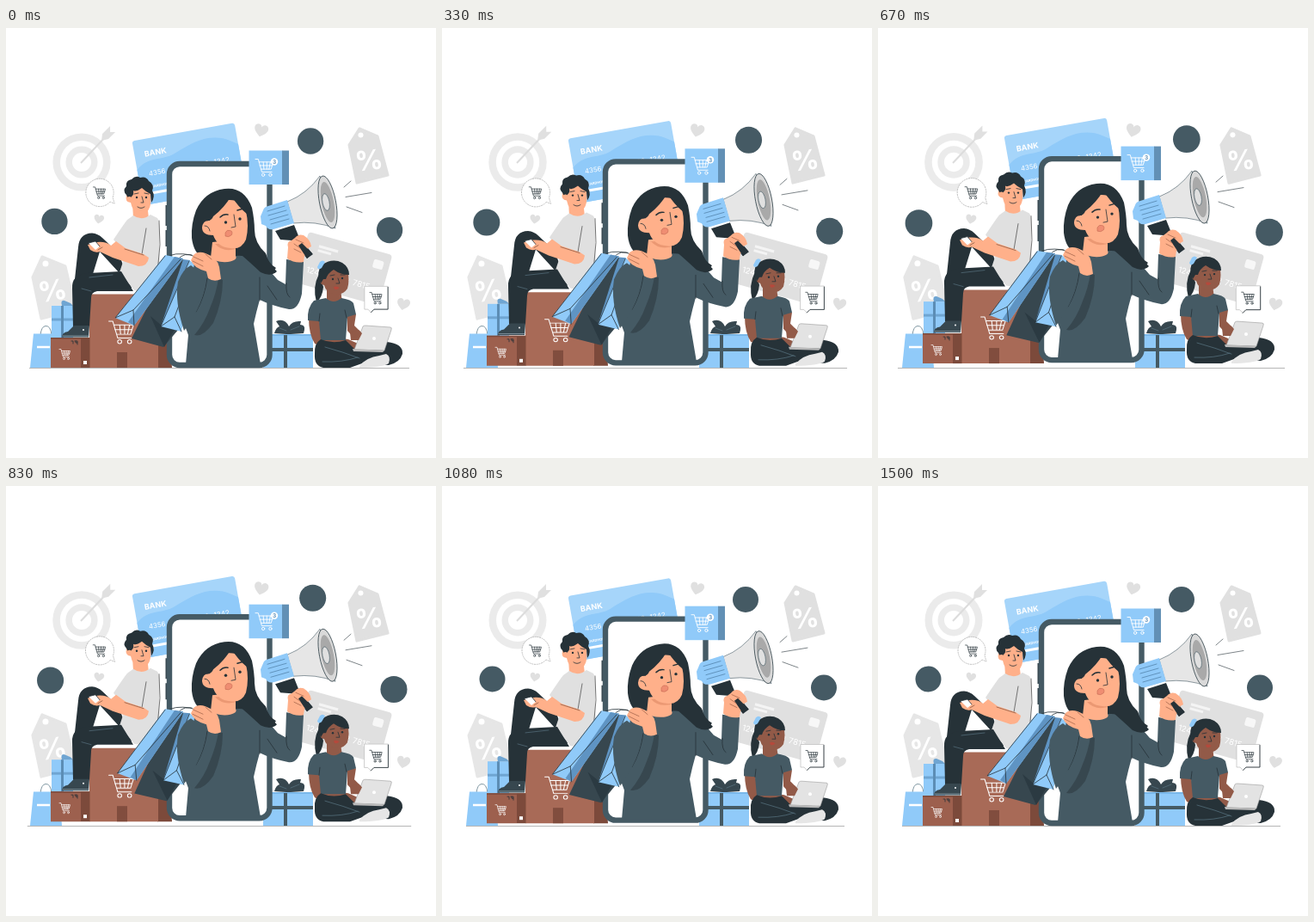
These frames come from a looping animation (500 px wide and 500 px high, 1.54 s). An HTML page:

```html
<!DOCTYPE html>
<html lang="en">
<head>
<meta charset="utf-8">
<title>Online shopping</title>
<style>
html, body { margin: 0; width: 100%; height: 100%; overflow: hidden; background: #fff; }
svg { display: block; width: 100%; height: 100%; }
text { font-family: Inter, "Open Sans", sans-serif; }
.b { fill: #90caf9; }
.d { fill: #455a64; }
.k { fill: #263238; }
.g { fill: #e0e0e0; }
.l { fill: #ebebeb; }
.w { fill: #fff; }
.s { fill: #ffb08a; }
.t { fill: #925a48; }
.ln { fill: none; stroke: #263238; stroke-width: .8; stroke-linecap: round; stroke-linejoin: round; }
</style>
</head>
<body>
<svg viewBox="0 0 500 500">
<defs>
  <g id="cart" fill="none" stroke-linecap="round" stroke-linejoin="round">
    <path d="M0 0H4L9 18H23M5 4H25L22 14H8M6 9H23.500M11 4L12 14M16 4V14M21 4L19 14"/>
    <circle cx="11" cy="22" r="2"/><circle cx="21" cy="22" r="2"/>
  </g>
  <path id="heart" d="M0 7C-4 4-8 1-8-3C-8-8-1-9 0-4C1-9 8-8 8-3C8 1 4 4 0 7Z"/>
</defs>

<path data-beat=".04 248 395" d="M28 395.500H468" stroke="#b5b5b5"/>

<!-- background -->
<g data-beat=".02 88 156">
  <circle class="l" cx="88" cy="156" r="33.500"/><circle class="w" cx="88" cy="156" r="25"/>
  <circle class="l" cx="88" cy="156" r="18.500"/><circle class="w" cx="88" cy="156" r="11"/>
  <path d="M87 157L119 123" stroke="#dcdcdc" stroke-width="2"/>
  <path class="g" d="M111 131L112 123L121 114L121 121L127 121L119 129Z"/>
</g>
<g data-beat=".01 422 148">
  <path class="g" stroke="#e0e0e0" stroke-width="3" stroke-linejoin="round" d="M411 117L432 126L444 171L408 180L399 136Z"/>
  <circle class="w" cx="412.500" cy="124.500" r="3"/>
  <text class="w" x="422" y="165" font-size="32" font-weight="700" text-anchor="middle" transform="rotate(-7 422 154)">%</text>
</g>
<g data-beat=".01 55 300">
  <path fill="#e6e6e6" stroke="#e6e6e6" stroke-width="3" stroke-linejoin="round" d="M42 266L69 277L81 328L41 338L31 290Z"/>
  <circle class="w" cx="46" cy="274" r="3.500"/>
  <text class="w" x="54" y="317" font-size="33" font-weight="700" text-anchor="middle" transform="rotate(-10 54 306)">%</text>
</g>
<g class="g">
  <use href="#heart" data-beat=".08 296.500 119" data-at="translate(296.500 119.500) rotate(14)"/>
  <use href="#heart" data-beat=".08 108 222" data-at="translate(108 222.500) rotate(10) scale(.72)"/>
  <use href="#heart" data-beat=".08 462 321" data-at="translate(462 321.500) rotate(12) scale(.93)"/>
</g>
<g transform="translate(352 237) rotate(15.500)">
  <rect class="g" width="101" height="61" rx="4"/>
  <path d="M16 13H39M16 18H32" stroke="#f4f4f4" stroke-width="3"/>
  <rect x="82" y="10" width="12" height="10" rx="2" fill="#f7f7f7"/>
  <text class="w" font-size="9.500" y="46"><tspan x="9">1245</tspan><tspan x="38">6542</tspan><tspan x="65">7815</tspan></text>
</g>

<!-- bank card -->
<g data-float="6"><g transform="translate(146.500 131.500) rotate(-10.100)">
  <rect width="121" height="76" rx="3" fill="#a6d5fa"/>
  <path class="b" d="M0 34C16 20 30 29 46 23C66 15 80 10 96 13C108 15 116 22 121 25V73Q121 76 118 76H3Q0 76 0 73Z"/>
  <text class="w" x="11.500" y="20.500" font-size="9" font-weight="700">BANK</text>
  <text class="w" font-size="8" y="43.500"><tspan x="12.500">4356</tspan><tspan x="38">8217</tspan><tspan x="64">6093</tspan><tspan x="89.500">1342</tspan></text>
  <text class="w" x="13" y="57.500" font-size="4" font-weight="700">CARDHOLDER</text>
  <path d="M13 63.500H34" stroke="#fff" stroke-width="3"/>
</g></g>

<!-- parcels on the ground -->
<g>
  <path class="ln" d="M40 357Q41 347 46 346.500Q52 346 53 357" style="stroke:#607d8b"/>
  <path class="b" d="M32 355.500H62L65 395H28Z"/>
  <path d="M36 371H51" stroke="#fff" stroke-width="2.500"/>
  <rect class="b" x="299" y="357" width="58" height="38"/>
  <rect x="298" y="356" width="59.500" height="2" fill="#7ab8ea"/>
  <path d="M299 374H357M325 357V395" stroke="#455a64" stroke-width="4"/>
  <path d="M326 356L312 355Q314 348 318 347L314 341Q324 337 329 347Q333 340 343 341L342 345Q348 345 347 351L346 355L331 356Z" fill="#37474f"/>
  <path class="ln" d="M326 352L318 349M331 351L341 347" style="stroke:#607d8b;stroke-width:.6"/>
</g>

<!-- boxes -->
<g data-float="5">
  <rect class="b" x="53" y="323" width="25" height="40"/>
  <path d="M53 339H78" stroke="#6fa5d2" stroke-width="3"/>
  <path d="M65.500 323V361" stroke="#5c8db5" stroke-width="3"/>
  <path d="M65 323Q63 316 68 317L75 320L78 323Z" fill="#6fa5d2"/>
  <path d="M176 310H187L193 395H176Z" fill="#7c4a3b"/>
  <path d="M97 309.500H177V395H97Z" fill="#a86a57"/>
  <rect x="129" y="377" width="12" height="18" fill="#814d3e"/>
  <use href="#cart" transform="translate(119.500 341) scale(1.150 1.080)" stroke="#fff" stroke-width=".9"/>
  <path d="M52 360H87V395H52Z" fill="#9d604e"/>
  <path d="M87 360H97.500V395H87Z" fill="#7c4a3b"/>
  <path d="M52 360H97V361.500H52Z" fill="#7c4a3b"/>
  <rect class="w" x="90" y="387" width="4" height="4"/>
  <path d="M76 364H78V367M80 364H83V366H81V364M83 366V368" class="ln"/>
  <use href="#cart" transform="translate(62 373.500) scale(.5)" stroke="#fff" stroke-width="1.400"/>
</g>

<!-- seated man -->
<g data-float="5.500">
  <path class="k" d="M80 292L84 255Q85 239 100 238.500Q107 239 112 244L131 262L146 302L94 302L131 284L109 260L101 286Z"/>
  <path class="s" d="M147 203H164L166 222Q158 229 148 221Z"/>
  <path class="g" d="M148 218Q158 225 168 217L176 221Q180 227 178 250L179 298Q165 309 149 305L132 284L140 260Q130 253 125 246Q137 228 141 223Z"/>
  <path class="ln" d="M163 233L158 263L136 257M178 224L179 252L175 296" style="stroke:#555"/>
  <path class="s" d="M128 248L139 256L160 263L166 267Q165 277 154 277Q136 271 124 267L109 260Q104 262 98 258L95 252L106 249Q116 248 122 253Z"/>
  <path d="M96 250L104 248L109 254L104 258Z" class="w"/><path class="ln" d="M96 250L104 248L109 254"/>
  <path class="ln" d="M160 264L138 257M107 258L112 255" style="stroke:#8d5b45"/>
  <path class="k" d="M77 303Q76 286 96 285L134 283L148 306H106Q99 307 99 314L97 347H78Z"/>
  <path class="ln" d="M97 290L124 287M99 306L88 303" style="stroke:#607d8b;stroke-width:.6"/>
  <path d="M79 346H97L96 359.500H65Q65 354 72 353Z" fill="#37474f"/>
  <path class="ln" d="M66 358H96" style="stroke:#90a4ae"/><circle class="w" cx="90" cy="351" r="1"/>
  <path class="s" d="M143 186Q156 178 168 187L168.500 200Q168 215 158 216Q147 215 145 203Q138 202 140 195Z"/>
  <path class="k" d="M144 202L140 194Q135 189 140 184Q139 177 146 176Q151 171 156 174Q163 172 166 178Q173 182 170 189Q174 196 169 203L168 193Q162 190 158 186Q151 191 148 189Q149 194 146 196Z"/>
  <circle class="s" cx="143.500" cy="199" r="3"/>
  <circle class="k" cx="152" cy="197" r="1.200"/><circle class="k" cx="163" cy="197" r="1.200"/>
  <path class="ln" d="M149 193L154 192M161 192L166 193M158 196L160 203L157 203M153 208Q157 211 161 208"/>
</g>

<!-- phone -->
<g data-float="6">
  <path d="M187 206V230M187 235V254" stroke="#37474f" stroke-width="3"/>
  <rect class="w" x="190" y="158" width="116.500" height="234" rx="12" stroke="#455a64" stroke-width="6.400"/>
</g>

<!-- cart tile -->
<g data-float="5">
  <rect class="b" x="282.500" y="142.500" width="39" height="39.500"/>
  <path d="M321 142.500H329V182H321Z" fill="#6290b5"/>
  <use href="#cart" transform="translate(290 152.500) scale(.83)" stroke="#fff" stroke-width="1.100"/>
  <circle class="w" cx="312" cy="155.500" r="4.200"/>
  <text x="312" y="157.800" font-size="6.500" font-weight="700" text-anchor="middle" fill="#5f90b8">3</text>
</g>

<!-- woman, bags and megaphone -->
<g data-float="6">
  <path class="k" d="M254 187Q277 184 286 209Q289 224 289 235Q289 250 302 262Q305 274 314 279Q308 288 291 280L266 268H230Q218 262 216 244Q215 228 221 212Q231 190 254 187Z"/>
  <path class="d" d="M238 267Q255 272 267 265Q284 264 291 271L303 278Q309 285 316 293L325 298L326 269L346 272L344 309Q340 328 329 327Q309 323 295 316Q291 330 288 344L296 391H209L212 357Q197 318 199 296Q204 276 224 270Z"/>
  <path class="s" d="M240 249L267 246L267 265Q270 270 258 272Q244 273 238 267Z"/>
  <path d="M243 251Q252 261 267 257V250Z" fill="#eb9873"/>
  <path class="k" d="M268 259L288 242Q293 258 302 263Q304 273 315 283Q308 290 296 284Q281 270 268 259Z"/>
  <g transform="translate(2 0)">
    <path class="s" d="M235 224Q241 203 256 200Q272 199 277 213Q281 230 277 246Q272 258 259 256Q244 255 239 241Q226 241 226 232Q227 223 235 224Z"/>
    <path class="k" d="M224 234Q223 226 230 224Q237 225 239 219Q252 209 260 195Q267 207 279 217L284 214Q278 190 252 188Q225 193 220 220Z"/>
    <circle class="k" cx="253.500" cy="226" r="1.700"/><circle class="k" cx="270" cy="222" r="1.700"/>
    <path class="ln" d="M247 220Q251 216 256 217M267 212L274 210" style="stroke-width:1.500"/>
    <path class="ln" d="M263 217L265 231L260 232M229 230Q234 230 235 236"/>
    <path d="M253 238Q255 234 258.500 235.500Q262 236 260.500 240.500Q257 244 253 242Z" fill="#ef8d72" stroke="#b8614a" stroke-width=".5"/>
  </g>
  <path class="d" d="M215 276L233 290L252 293Q252 318 241 343Q229 360 219 357Q208 352 203 335Q196 319 200 295Q206 280 215 276Z"/>
  <path d="M252 293Q252 318 241 343Q229 360 219 357Q231 343 237 326Q245 307 247 291Z" fill="#37474f"/>
  <path class="ln" d="M234 291Q231 313 221 330M295 317V290M304 300L315 316M326 297Q325 310 330 313"/>

  <g data-swing="-2 212 264">
    <path class="ln" d="M188 267Q193 260 216 264M199 270Q207 259 220 266"/>
    <path d="M194 266L218 273L207 343L183 371L146 361L170 313Z" fill="#37474f"/>
    <path d="M184 371L201 342L181 346L168 335Z" fill="#2b3a42"/>
    <path class="b" d="M185 264L206 268L149 346L127 337Z"/>
    <path d="M196 266L206 268L149 346L142 342Z" fill="#5f94c3"/>
    <path class="ln" d="M185 265L127 337L148 328L203 269M148 328L149 346"/>
    <path d="M206 269L214 270L193 333L180 347Z" fill="#5f94c3"/>
    <path class="b" d="M213 270L219 274L204 353L180 347Z"/>
    <path class="ln" d="M213 271L180 347L196 336L216 282M196 336L204 353"/>
  </g>
  <path class="d" d="M215 276L233 290Q231 320 207 352Q196 319 200 295Q206 280 215 276Z"/>
  <path class="s" d="M218 264Q223 259 232 262Q246 267 248 278L250 292Q242 296 235 291L233 283Q218 279 215 270Z"/>
  <path class="ln" d="M218 266L229 271M217 271L229 277M232 263L239 269" style="stroke:#a9694e"/>

  <path class="k" d="M313 236L335 229L341 244L356 262L350 268L332 247L319 246Z"/>
  <path d="M327 202Q350 193 365 172L383 233Q360 224 334 227Z" fill="#e6e6e6" stroke="#455a64" stroke-width=".6"/>
  <ellipse cx="374" cy="202.500" rx="9.500" ry="31" transform="rotate(-11 374 202.500)" fill="#d9d9d9" stroke="#37474f" stroke-width=".8"/>
  <ellipse cx="374" cy="202.500" rx="7" ry="24" transform="rotate(-11 374 202.500)" fill="#a9a9a9"/>
  <ellipse cx="372" cy="202.500" rx="4" ry="10" transform="rotate(-11 372 202.500)" fill="#e0e0e0" stroke="#455a64" stroke-width=".6"/>
  <path class="b" d="M299 212Q300 208 305 207L327 200L335 227L311 234Q304 235 302 230L297 228L296 219Z"/>
  <path class="ln" d="M304 213L324 207M305 218L326 212M307 223L328 217M308 228L329 222" style="stroke:#5484ac"/>
  <path class="s" d="M336 244Q340 239 346 241Q354 246 355 254L350 257Q353 263 347 265L346 272Q336 274 327 268L328 255Q326 248 332 247Z"/>
  <path class="k" d="M340 253L344 250L357 263L350 268Z"/>
  <path class="ln" d="M337 246L346 250M335 251L342 256M335 257L343 261" style="stroke:#a9694e"/>
  <path class="ln" d="M393 185L401 178M395 196.500L425 191.500M396 208L414 214.500" style="stroke-width:.6"/>
</g>

<!-- seated woman -->
<g data-float="5">
  <path class="k" d="M364 286Q356 301 361 319Q368 313 369 301Z"/>
  <path class="t" d="M373 304H389L391 319Q381 325 373 317Z"/>
  <path class="t" d="M352 337L364 340L369 358L398 362L414 369L411 375L388 374Q367 372 359 367Q352 356 352 337ZM397 333L407 333L405 346L413 354L407 363L397 352Z"/>
  <path class="d" d="M372 314Q381 322 390 314Q402 316 404 320L407 333L397 336L395 363H366L364 341L351 340Q350 325 358 317Z"/>
  <path class="ln" d="M364 341L365 332M396 337L394 328"/>
  <path class="k" d="M366 362Q380 368 395 363L405 373Q423 366 443 365Q462 367 461 379Q458 389 445 392L414 390L400 395H369Q358 393 359 379Q358 367 366 362Z"/>
  <path class="ln" d="M371 371Q393 377 411 384M368 388Q391 389 409 383" style="stroke:#546e7a"/>
  <path d="M411 393Q419 383 434 381L442 379Q448 382 445 390Q437 395 411 395Z" fill="#e6e6e6"/>
  <path class="t" d="M370 284Q382 274 397 282Q400 292 397 303Q391 312 380 309Q372 307 370 299Q364 298 365 291Z"/>
  <path class="k" d="M366 297Q360 284 367 276Q379 267 391 273Q399 278 399 287Q389 287 381 281Q374 285 372 292L369 292Z"/>
  <path d="M365 272Q368 269 371 272L367 279Q363 282 362 278Z" class="b"/>
  <circle class="k" cx="380" cy="292" r="1.200"/><circle class="k" cx="391" cy="291" r="1.200"/>
  <path class="ln" d="M377 288L382 287M389 287L394 287M386 291L388 297L384 297"/>
  <path d="M381 301Q385 299.500 387.500 302Q385 305 382 303.500Z" fill="#b5493c"/>
  <path d="M415 347Q416 346 418 346L447 348Q449 348 448 351L440 375L405 374Z" fill="#e3e3e3" stroke="#9a9a9a" stroke-width=".6"/>
  <path d="M403 373L440 375L438 377L404 376Z" fill="#b9b9b9"/>
  <circle class="w" cx="428" cy="361" r="2"/>
  <path class="t" d="M400 354L410 351L414 355L410 363L401 363Z"/>
</g>

<!-- bubbles -->
<g data-beat=".09 109.500 191">
  <path class="w" d="M121 202A16 16 0 1 1 124 197L126 204Z" stroke="#aaa" stroke-width=".7" stroke-dasharray="2 .7"/>
  <use href="#cart" transform="translate(101.500 185) scale(.56)" stroke="#263238" stroke-width="1.200"/>
</g>
<g data-beat=".09 430.500 314">
  <path class="w" d="M417 300.500H444V327H428L424.500 330.500L421 327H417Z" stroke="#bbb" stroke-width=".7"/>
  <path class="ln" d="M444 301.500V327H428L424.500 330.500"/>
  <use href="#cart" transform="translate(423 307.500) scale(.56)" stroke="#263238" stroke-width="1.200"/>
</g>

<!-- round badges -->
<g class="d" data-beat=".1 251 181">
  <circle cx="58.500" cy="224.500" r="15"/>
  <circle cx="353" cy="132" r="15"/>
  <circle cx="444" cy="234.500" r="15"/>
</g>
</svg>
<script>
const LOOP = 1540, SPAN = 1500, LEAD = 15;
const floats = [...document.querySelectorAll('[data-float]')];
const beats = [...document.querySelectorAll('[data-beat]')].map(el => {
  const [amp, x, y] = el.dataset.beat.split(' ').map(Number);
  return { el, amp, x, y, at: el.dataset.at || '' };
});
const bags = document.querySelector('[data-swing]');
const [angle, px, py] = bags.dataset.swing.split(' ').map(Number);

// Two linear pulses, then a rest
const keys = [[0, 0], [.1, 1], [.3, 0], [.4, 0], [.5, 1], [.6, 0], [1, 0]];
function pulse(p) {
  const i = Math.max(1, keys.findIndex(k => k[0] >= p));
  const [a, u] = keys[i - 1], [b, v] = keys[i];
  return u + (v - u) * (p - a) / (b - a);
}

function draw(ms) {
  const p = Math.min(1, (ms % LOOP + LEAD) / SPAN);
  const lift = (1 - Math.cos(2 * Math.PI * p)) / 2;
  const beat = pulse(p);
  for (const el of floats) {
    el.setAttribute('transform', `translate(0 ${-lift * el.dataset.float})`);
  }
  bags.setAttribute('transform', `rotate(${angle * lift} ${px} ${py})`);
  for (const { el, amp, x, y, at } of beats) {
    el.setAttribute('transform',
      `translate(${x} ${y}) scale(${1 + amp * beat}) translate(${-x} ${-y}) ${at}`);
  }
}

const start = performance.now();
function tick() {
  draw(performance.now() - start);
  requestAnimationFrame(tick);
}
tick();
</script>
</body>
</html>
```
